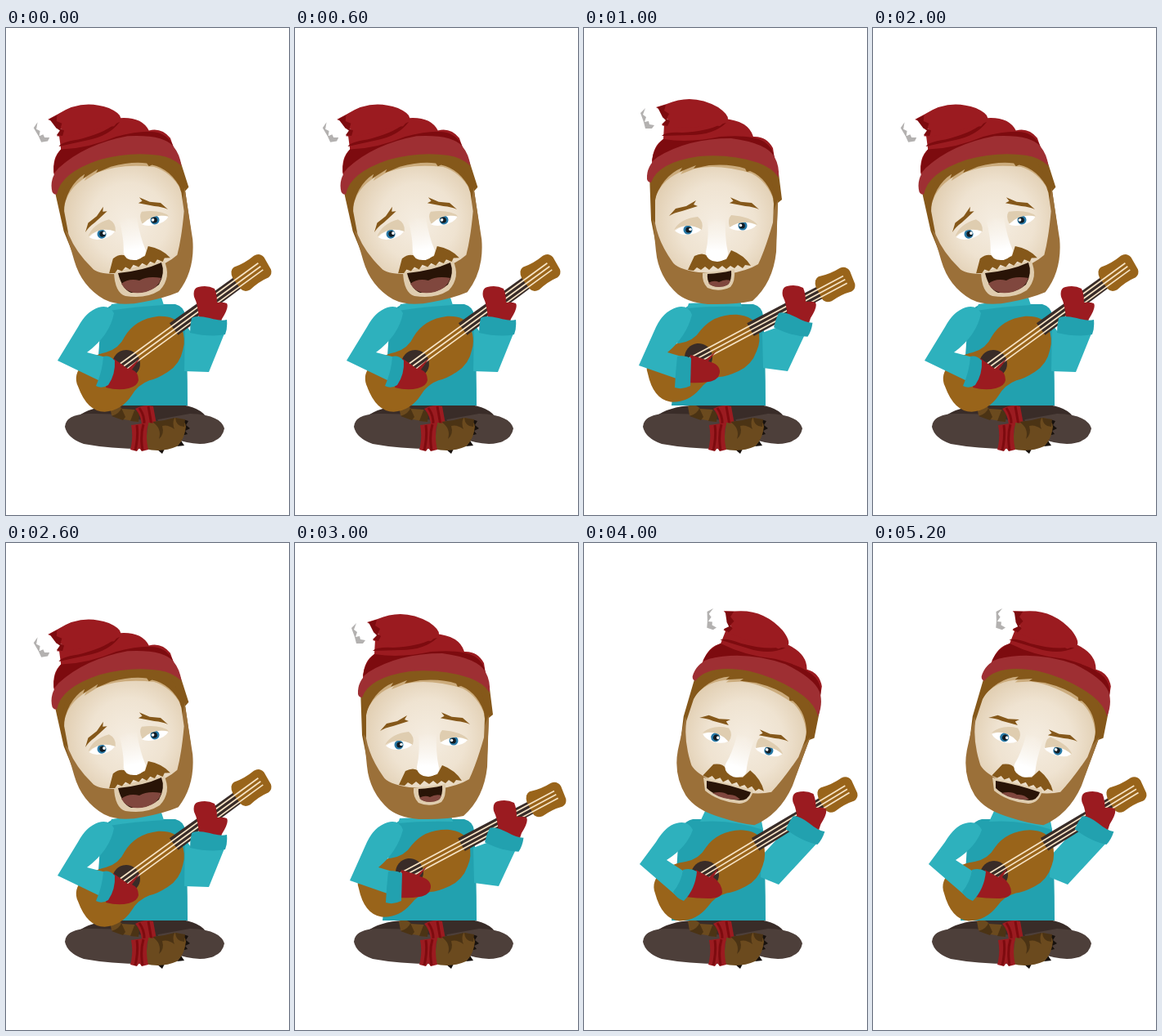
An HTML page that plays this animation: 346 by 596 pixels, repeating every 6000 ms.

```html
<!DOCTYPE html>
<html lang="en">
<head>
<meta charset="utf-8">
<title>Guitar player</title>
<style>
html, body { margin: 0; width: 100%; height: 100%; overflow: hidden; background: #fff; }
svg { display: block; width: 100vw; height: 100vh; }
</style>
</head>
<body>
<svg id="stage" viewBox="0 0 346 596">
  <defs>
    <radialGradient id="skin" gradientUnits="userSpaceOnUse" cx="162" cy="238" r="86">
      <stop offset="0" stop-color="#f5ede1"/>
      <stop offset=".55" stop-color="#efe3d1"/>
      <stop offset="1" stop-color="#dfcbad"/>
    </radialGradient>
    <linearGradient id="noseLight" x1="0" y1="0" x2="0" y2="1">
      <stop offset="0" stop-color="#fff" stop-opacity="0"/>
      <stop offset=".75" stop-color="#fff"/>
    </linearGradient>
  </defs>
</svg>
<script>
const NS = 'http://www.w3.org/2000/svg';
const stage = document.getElementById('stage');

const C = {
  teal: '#22a1af', tealLight: '#2eb1bd', red: '#9b1b20', redDark: '#7d0b0f', band: '#9e2f33',
  hair: '#85581a', beard: '#9b7039', lip: '#dfccae', lid: '#dfcdb0', wood: '#99641a',
  dark: '#392c28', leg: '#4d3f3a', shoe: '#6b4a1e', shoeDark: '#4b3314'
};

function add(parent, tag, attrs = {}) {
  const el = document.createElementNS(NS, tag);
  for (const key in attrs) el.setAttribute(key, attrs[key]);
  return parent.appendChild(el);
}
const group = (parent = stage) => add(parent, 'g');
const shape = (parent, fill, d = '') => add(parent, 'path', { fill, d });
const line = (parent, stroke, width, d) =>
  add(parent, 'path', { d, stroke, fill: 'none', 'stroke-width': width });
const dot = (parent, fill, cx, cy, r) => add(parent, 'circle', { fill, cx, cy, r });

function drawLegs() {
  const g = group();
  shape(g, C.dark, 'M91 473Q112 460 150 462L200 460Q234 461 244 475L180 490Z');
  shape(g, C.leg, 'M72 488Q73 473 100 472Q150 471 181 480L225 472Q262 473 267 490Q264 508 237 509Q220 508 207 503L170 515Q127 515 95 509Q75 502 72 488Z');
  shape(g, C.dark, 'M127 472L184 472L186 481Q160 480 138 475Z');
  shape(g, C.shoe, 'M127 463Q136 459 142 466L157 467Q163 472 162 482L144 479L129 474Z');
  shape(g, C.shoeDark, 'M141 465L146 476L143 480L129 475Q139 472 141 465ZM157 468L163 471L162 482L152 481Z');
  shape(g, C.red, 'M158 466Q169 460 180 463L184 485L166 488Q166 475 158 466Z');
  line(g, C.redDark, 3, 'M163 465Q170 475 169 487M174 463L178 486');
  shape(g, '#17110d', 'M217 479L223 481L220 486L225 490L219 493L222 497L214 499ZM214 505L218 511L209 512ZM194 515L191 521L185 516Z');
  shape(g, C.shoe, 'M174 483Q194 486 207 477Q219 478 220 488Q218 504 209 512Q191 520 170 515Z');
  shape(g, C.shoeDark, 'M179 482Q193 481 206 477Q203 484 206 491Q198 485 191 487Q194 497 187 503Q191 490 179 482ZM207 477L219 479L218 488Q208 488 207 477Z');
  shape(g, C.red, 'M153 486L174 483Q170 500 174 516L166 518L163 514L160 518L152 516Q156 501 153 486Z');
  line(g, C.redDark, 3, 'M160 486Q162 500 158 517M168 485Q164 499 167 517');
}

function drawHeadBack(g) {
  shape(g, C.hair, 'M80 178Q90 154 155 150Q222 150 238 178L242 210L237 214L235 260L87 260L82 235Z');
  shape(g, C.beard, 'M84 234L90 243L222 250L237 210L235 274Q231 312 206 334Q188 338 162 338Q132 339 115 326Q91 305 88 273Z');
  shape(g, 'url(#skin)', 'M87 211Q92 182 113 173Q160 159 207 171Q228 180 232 215L231 238Q222 270 213 289Q200 297 176 301L140 299Q113 295 108 286Q91 262 87 239Z');
  shape(g, '#cbab7c', 'M88 205Q92 180 113 169Q160 155 206 169Q226 181 232 211Q224 188 205 178Q166 166 136 172L118 179L121 175Q97 184 88 205Z');
  shape(g, C.hair, 'M85 214Q87 182 109 165Q160 149 214 163Q232 176 233 213Q225 184 203 175L199 176L197 172Q180 166 153 168L134 172L137 168L117 176L120 171Q95 181 85 214Z');
}

function drawHeadFront(g) {
  shape(g, '#fff', 'M111 248Q127 236 144 246Q138 253 125 253Q116 253 111 248Z');
  shape(g, '#fff', 'M177 244Q192 232 211 241Q206 248 192 248Q182 248 177 244Z');
  for (const [x, y, shine] of [[127, 247, 3], [194, 242, -2.5]]) {
    dot(g, '#2879a6', x, y, 5.5);
    dot(g, '#111c24', x + shine * .3, y, 3.6);
    dot(g, '#fff', x + shine, y - .5, 1.8);
  }
  shape(g, C.lid, 'M110 247Q118 233 139 231Q147 237 144 247Q127 237 110 247Z');
  shape(g, C.lid, 'M178 244Q175 234 180 229Q205 231 212 241Q194 233 178 244Z');
  shape(g, C.hair, 'M127 296L135 279Q145 274 151 279Q162 287 174 283L180 272Q196 278 204 291L197 290L194 294L188 290L184 294L179 291L174 295L169 291L164 295L158 291L153 296L148 292L143 296L138 293L134 297Z');
  shape(g, 'url(#noseLight)', 'M151 233Q153 257 149 274Q149 285 163 286Q177 284 176 275Q172 258 173 233Z');
  drawHat(g);
}

function drawHat(g) {
  shape(g, C.red, 'M83 165Q84 144 97 136L98 118L170 111Q201 113 207 133Q223 132 231 147L233 160Q160 138 83 165Z');
  shape(g, C.redDark, 'M83 163Q85 146 97 136Q130 141 166 133Q205 130 220 139Q231 146 233 159Q200 137 162 139Q110 142 83 163Z');
  shape(g, C.redDark, 'M95 132Q100 127 120 128Q152 126 166 118L174 116Q158 131 130 131Z');
  shape(g, C.red, 'M88 97L101 93Q133 79 164 97Q177 106 176 112L166 120Q149 117 136 122L102 121L95 119L103 112L96 109L98 103Z');
  shape(g, C.redDark, 'M90 97L100 94L98 101L104 105L101 111L105 114L102 120L95 118L100 113L96 109Z');
  shape(g, C.band, 'M77 185Q76 169 90 158Q127 135 180 135Q224 141 233 158Q239 169 238 183Q230 171 213 165Q180 154 141 157Q91 164 82 189Q78 189 77 185Z');
  shape(g, '#b3b1b0', 'M69 104L75 98L72 106L76 109L74 115L79 114L80 118L86 119L83 123L75 123L73 115Z');
}

// Guitar: sound hole at the origin, neck along x
function drawGuitar(g) {
  shape(g, C.wood, 'M-64 -12C-60 -34 -32 -35 -12 -26Q4 -20 18 -28Q41 -38 66 -24Q84 -12 81 3Q77 19 66 27Q53 39 35 38Q18 37 11 33Q-4 29 -17 35Q-38 43 -56 32Q-73 19 -64 -12Z');
  dot(g, C.dark, 0, 0, 17);
  shape(g, C.dark, 'M72 -9L173 -8V8L72 9Z');
  shape(g, C.wood, 'M167 -8Q169 -18 176 -18Q190 -14 204 -15Q212 -14 213 -6L211 11Q209 17 203 17Q190 14 176 16Q168 15 167 8Z');
  for (const y of [-4.5, .5, 5.5]) line(g, '#f6e3c5', 1.7, `M-10 ${y}H203`);
}

drawLegs();
const torso = group();
shape(torso, C.teal, 'M107 462Q113 410 115 370Q116 341 133 338H207Q218 341 219 352Q222 400 222 462Z');
const collar = shape(torso, C.tealLight);
const headBack = group();
const lips = shape(stage, C.lip);
const mouth = shape(stage, '#291407');
const tongue = shape(stage, '#80473e');
const headFront = group();
const BROW = 'M0 0L8 -9L21 -12L33 -19L30 -14L35 -12L16 -6Q6 -4 0 0Z';
const leftBrow = shape(stage, C.hair, BROW);
const rightBrow = shape(stage, C.hair, BROW);
const fretArm = shape(stage, C.tealLight);
const guitar = group();
const fretHand = shape(stage, C.red, 'M-13 0Q-14 -18 -19 -28Q-21 -38 -14 -40Q-3 -43 6 -38Q9 -31 9 -21Q16 -22 21 -20Q24 -15 15 -1L12 8H-11Z');
const fretCuff = shape(stage, C.teal, 'M-22 -2Q-17 -6 0 -2Q13 2 21 0Q22 10 19 18Q1 22 -24 16Q-24 6 -22 -2Z');
const strumArm = shape(stage, C.tealLight);
const strumHand = shape(stage, C.red);
const cuff = shape(stage, C.teal);
drawHeadBack(headBack);
drawHeadFront(headFront);
drawGuitar(guitar);

const mirroredBrow = (x, y) => `translate(${x} ${y}) rotate(-7) scale(-1 1)`;

const poses = [
  {
    head: 'rotate(-10.6 150 303)',
    leftBrow: 'translate(97 250) rotate(-25)',
    rightBrow: mirroredBrow(198, 222),
    collar: 'M126 346L129 338L190 330L193 339Q157 341 126 346Z',
    lips: 'M132 299L193 284Q203 305 188 321Q171 332 146 328Q133 324 132 299Z',
    mouth: 'M137 300Q168 297 190 287Q195 300 187 314Q175 325 153 324Q142 320 137 300Z',
    tongue: 'M141 313Q150 306 163 309Q173 303 190 306Q186 319 171 323Q149 328 141 313Z',
    guitar: 'translate(147 411) rotate(-36.1)',
    fretHand: 'translate(249 357)',
    fretCuff: 'translate(249 357)',
    fretArm: 'M219 362L226 372L267 374L248 421L218 420Z',
    strumArm: 'M132 349Q126 338 113 342Q98 347 88 366L63 407L117 433L122 403L99 397Q127 376 132 349Z',
    strumHand: 'M131 404L149 417L164 404L154 418Q162 421 162 431Q161 438 150 441Q137 444 122 440Z',
    cuff: 'M119 402Q126 400 133 407Q134 424 125 437Q117 442 110 438Q118 420 119 402Z'
  },
  {
    head: '',
    leftBrow: 'translate(104 230)',
    rightBrow: mirroredBrow(214, 222),
    collar: 'M126 343L128 337L191 334L193 341Q157 340 126 343Z',
    lips: 'M145 300L184 295Q185 311 179 317Q165 324 151 318Q144 311 145 300Z',
    mouth: 'M151 301Q167 300 180 297Q181 308 176 314Q164 319 154 314Q150 308 151 301Z',
    tongue: 'M152 312Q159 308 165 311Q172 307 179 309Q177 317 165 317Q156 317 152 312Z',
    guitar: 'translate(140 403) rotate(-28.1)',
    fretHand: 'translate(262 356)',
    fretCuff: 'translate(259 356) rotate(13)',
    fretArm: 'M218 373L237 366L270 375L249 420L219 416Z',
    strumArm: 'M132 351Q127 338 113 342Q97 347 88 366L67 413L113 429L119 402L102 397Q125 378 132 351Z',
    strumHand: 'M130 400L149 406L162 395L152 408Q166 411 166 421Q165 431 152 433Q140 435 128 434Z',
    cuff: 'M114 402Q122 400 131 404L130 438Q120 443 111 440Q112 420 114 402Z'
  },
  {
    head: 'translate(193.3 246) rotate(18.3) translate(-160.5 -244.5)',
    leftBrow: 'translate(141 214) rotate(33)',
    rightBrow: mirroredBrow(250, 243),
    collar: 'M142 341L148 328L217 340L219 351Q182 338 142 341Z',
    lips: 'M146 287L207 302Q204 318 190 319Q163 316 148 303Z',
    mouth: 'M150 291Q175 295 204 305Q201 315 190 315Q162 312 150 300Z',
    tongue: 'M157 306Q169 303 176 308Q185 307 191 314Q171 315 157 306Z',
    guitar: 'translate(148 406) rotate(-31.2)',
    fretHand: 'translate(274.5 345)',
    fretCuff: 'translate(275 345) rotate(23)',
    fretArm: 'M217 383L251 346L288 364L238 418L216 409Z',
    strumArm: 'M133 351Q127 339 113 343Q100 346 88 366L68 393L112 431L124 403L101 388Q126 372 133 351Z',
    strumHand: 'M137 400L153 409L165 397L158 409Q169 417 169 428Q167 435 152 435Q138 435 124 433Z',
    cuff: 'M121 400Q130 397 138 402Q136 424 122 438Q113 435 109 427Q119 415 121 400Z'
  }
];

const outlines = { collar, lips, mouth, tongue, fretArm, strumArm, strumHand, cuff };
const placed = { guitar, fretHand, fretCuff, leftBrow, rightBrow };
const BEATS = [0, 1, 0, 1, 2, 2];
const BEAT = 1000;

function show(pose) {
  for (const key in outlines) outlines[key].setAttribute('d', pose[key]);
  for (const key in placed) placed[key].setAttribute('transform', pose[key]);
  for (const part of [headBack, headFront]) part.setAttribute('transform', pose.head);
}

const start = performance.now();
function tick() {
  const beat = Math.floor((performance.now() - start) / BEAT) % BEATS.length;
  show(poses[BEATS[beat]]);
  requestAnimationFrame(tick);
}
tick();
</script>
</body>
</html>
```
